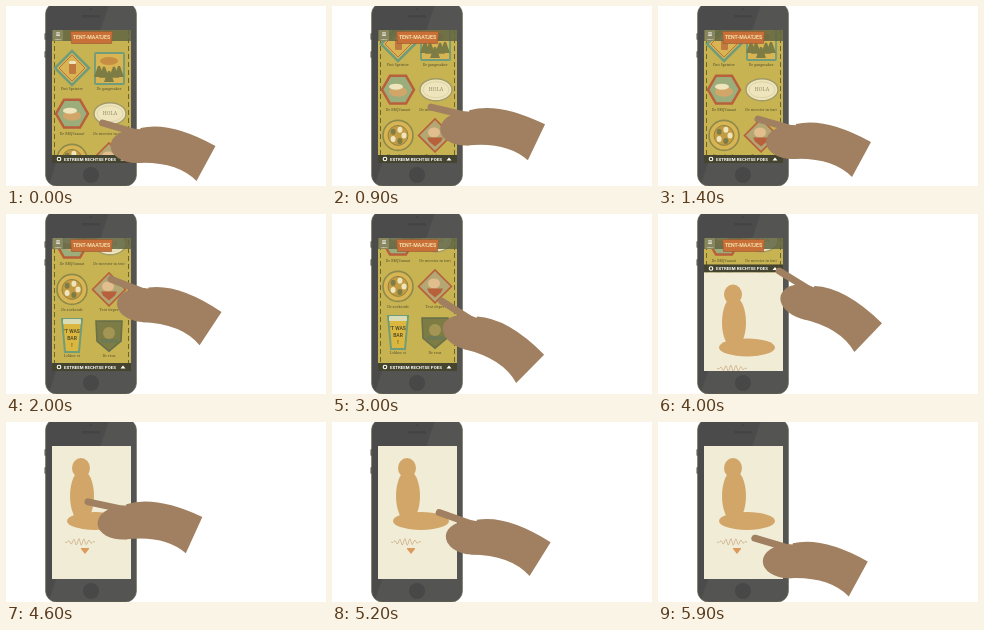
Recreate the animation shown at these times as an HTML page with a canvas. Size 320 by 180 pixels, loop 6000 ms.

```html
<!DOCTYPE html>
<html lang="nl">
<head>
<meta charset="utf-8">
<title>Telefoon met hand</title>
<style>
html, body { margin: 0; width: 100%; height: 100%; overflow: hidden; background: #fff; }
canvas { display: block; width: 100vw; height: 100vh; }
</style>
</head>
<body>
<canvas id="stage" width="320" height="180"></canvas>
<script>
const ctx = document.getElementById('stage').getContext('2d');
const LOOP = 6000, STEP = 100;
const SCREEN = { x: 46, y: 24, w: 79, h: 133 };
const TEAL = '#6f9c7a', CREAM = '#efe5bd', RED = '#b8603c', DARK = '#55502c';
const GOLD = '#d8b552', OLIVE = '#7d7c45', TAN = '#d2a668';

const REST = { x: 94.5, y: 117, tilt: 0 };
const GESTURES = [
  { until: 850, x: 97, y: 101, tilt: -3 },
  { until: 1400, x: 98, y: 113, tilt: 0 },
  { until: 2000, x: 103, y: 65, tilt: 5 },
  { until: 2900, x: 108, y: 87, tilt: 16 },
  { until: 3500, x: 108, y: 83, tilt: 17 },
  { until: 4200, x: 122, y: 50, tilt: 15 },
  { until: 4600, x: 80, y: 80, tilt: -4 },
  { until: 4950, x: 107, y: 86, tilt: 4 },
  { until: LOOP, ...REST }
];

function ease(t, from, to) {
  const u = Math.min(1, Math.max(0, (t - from) / (to - from)));
  return u * u * (3 - 2 * u);
}

function handPose(t) {
  let pose = REST, start = 0;
  for (const next of GESTURES) {
    const s = ease(t, start, next.until);
    const mix = key => pose[key] + (next[key] - pose[key]) * s;
    pose = { x: mix('x'), y: mix('y'), tilt: mix('tilt') };
    start = next.until;
  }
  return pose;
}

const scrollAt = t => 24 * ease(t, 0, 900) + 54 * ease(t, 1400, 2000) + 3 * ease(t, 2000, 3000);

function paint(fill, stroke, width = 1) {
  if (fill) { ctx.fillStyle = fill; ctx.fill(); }
  if (stroke) { ctx.strokeStyle = stroke; ctx.lineWidth = width; ctx.stroke(); }
}

function box(x, y, w, h, r, fill, stroke, width) {
  ctx.beginPath();
  ctx.roundRect(x, y, w, h, r);
  paint(fill, stroke, width);
}

function oval(x, y, rx, ry, fill, stroke, width) {
  ctx.beginPath();
  ctx.ellipse(x, y, rx, ry, 0, 0, 2 * Math.PI);
  paint(fill, stroke, width);
}

function regular(x, y, r, n, fill, stroke, width) {
  ctx.beginPath();
  for (let i = 0; i < n; i++) {
    const a = i * 2 * Math.PI / n;
    ctx.lineTo(x + r * Math.cos(a), y + r * Math.sin(a));
  }
  ctx.closePath();
  paint(fill, stroke, width);
}

// A symmetric trapezium, optionally ending in a point below.
function taper(x, y, top, bottom, h, point, fill, stroke, width) {
  ctx.beginPath();
  ctx.moveTo(x - top, y);
  ctx.lineTo(x + top, y);
  ctx.lineTo(x + bottom, y + h);
  ctx.lineTo(x, y + h + point);
  ctx.lineTo(x - bottom, y + h);
  ctx.closePath();
  paint(fill, stroke, width);
}

function text(s, x, y, font, color, align = 'center') {
  ctx.font = font;
  ctx.fillStyle = color;
  ctx.textAlign = align;
  ctx.textBaseline = 'middle';
  ctx.fillText(s, x, y);
}

function drawPhone() {
  [27, 45].forEach(y => box(38.5, y, 3, 7, 1, '#555'));
  const shine = ctx.createLinearGradient(60, 80, 90, 90);
  shine.addColorStop(0.45, '#4a4b4a');
  shine.addColorStop(0.5, '#545553');
  box(39.6, -3, 90.8, 183, 11, shine, '#68694f', 0.7);
  box(76, 9, 18, 2.5, 1.2, '#444543');
  oval(85, 3, 1.3, 1.3, '#444543');
  oval(85, 169, 8, 8, '#474847');
}

const badges = [
  ['Pint Sprinter', (x, y) => {
    regular(x, y, 17, 4, GOLD, TEAL, 2.5);
    regular(x, y, 13, 4, null, RED, 0.8);
    box(x - 3, y - 7, 7, 13, 1, '#bf7a42');
    box(x - 3, y - 7, 7, 3, 1, CREAM);
  }],
  ['De gangmaker', (x, y) => {
    box(x - 14, y - 15, 29, 31, 1, GOLD, TEAL, 1.8);
    for (let i = -2; i <= 2; i++) taper(x + 5 * i, y + 3 * Math.cos(2 * i), 1, 5, 11, 0, OLIVE);
    oval(x, y - 7, 9, 4, '#c58e43');
  }],
  ["De BBQ'fanaat", (x, y) => {
    regular(x, y, 16, 6, '#9cad7c', RED, 2.5);
    oval(x, y + 2, 9, 5, TAN);
    oval(x - 2, y - 3, 7, 3, CREAM);
  }],
  ['De meester in tent', (x, y) => {
    oval(x + 1, y, 16, 11, CREAM, '#a19b68', 1.4);
    oval(x + 1, y, 13, 8, null, '#cfc799', 0.6);
    text('HOLA', x + 1, y, '5px "Noto Serif", serif', '#8f8c67');
  }],
  ['De zoekende', (x, y) => {
    oval(x, y, 15, 15, GOLD, '#8d8a4b', 1.6);
    oval(x, y, 10, 10, '#c39b43', OLIVE, 0.8);
    for (let i = 0; i < 5; i++) {
      oval(x + 6 * Math.cos(i * 1.26), y + 6 * Math.sin(i * 1.26), 2.5, 3, i % 2 ? OLIVE : CREAM);
    }
  }],
  ['Tent sleper', (x, y) => {
    regular(x, y, 16.5, 4, '#b3a873', RED, 1.6);
    oval(x - 1, y - 3, 6, 5, '#e2bd8d');
    taper(x, y + 2, 8, 6, 4, 5, RED);
  }],
  ['Lekker ei', (x, y) => {
    taper(x, y - 16, 10, 7, 33, 0, '#dbb73f', TEAL, 2);
    box(x - 9, y - 16, 18, 5, 1, '#d9dcb4');
    ["'T WAS", 'BAR', '!'].forEach((s, i) =>
      text(s, x, y - 4 + 7 * i, 'bold 5px Roboto, sans-serif', DARK));
  }],
  ['De reus', (x, y) => {
    taper(x, y - 14, 13, 12, 20, 10, OLIVE, '#69704a', 1.6);
    oval(x, y - 2, 6, 6, '#a39655');
    box(x - 8, y + 4, 17, 4, 1, '#6d7a52');
  }]
];

function drawList(scroll) {
  ctx.fillStyle = '#c7b352';
  ctx.fillRect(SCREEN.x, SCREEN.y, SCREEN.w, SCREEN.h);
  ctx.beginPath();
  ctx.setLineDash([5, 3]);
  ctx.lineDashOffset = scroll;
  [48.5, 122.5].forEach(x => { ctx.moveTo(x, 24); ctx.lineTo(x, 149); });
  paint(null, DARK, 0.8);
  ctx.setLineDash([]);

  badges.forEach(([name, draw], i) => {
    const x = i % 2 ? 103 : 66, y = 62 + 45.7 * (i >> 1) - scroll;
    draw(x, y);
    text(name, x, y + 20.5, '3.6px "Noto Serif", serif', DARK);
  });
  drawHeader();
}

function drawHeader() {
  ctx.fillStyle = 'rgba(96, 101, 67, 0.85)';
  ctx.fillRect(SCREEN.x, SCREEN.y, SCREEN.w, 11);
  box(47, 24, 10, 11, 1, '#88865f');
  text('≡', 52, 28, 'bold 6px "DejaVu Sans", sans-serif', '#fff');
  text('MENU', 52, 33, '2.4px Roboto, sans-serif', '#fff');
  taper(85.5, 25.5, 21, 20, 12, 0, '#c87037', '#985934', 0.6);
  text('TENT-MAATJES', 85.5, 31.6, 'bold 5.2px Roboto, sans-serif', '#f3dfaa');
}

function drawBar(y) {
  ctx.fillStyle = '#44442f';
  ctx.fillRect(SCREEN.x, y, SCREEN.w, 8);
  oval(53, y + 4, 1.8, 1.8, null, '#fff', 1.1);
  text('EXTREEM RECHTSE POES', 58, y + 4.3, 'bold 4.4px Roboto, sans-serif', '#fff', 'left');
  taper(117, y + 2.5, 0, 2.5, 3, 0, '#fff');
}

function drawPoster(top) {
  ctx.save();
  ctx.translate(0, top - SCREEN.y);
  ctx.fillStyle = '#f1ecd5';
  ctx.fillRect(SCREEN.x, SCREEN.y, SCREEN.w, SCREEN.h);
  oval(75, 46, 9, 10, TAN);
  oval(76, 74, 12, 26, TAN);
  oval(89, 99, 28, 9, TAN);
  ctx.beginPath();
  for (let i = 0; i <= 30; i++) {
    ctx.lineTo(59 + i, 120 + 3.5 * Math.sin(i * 1.25) * Math.sin(i / 9.5));
  }
  paint(null, '#c9a683', 0.7);
  taper(79, 126, 4, 4, 1, 5, '#dc9a5c');
  ctx.restore();
}

function drawScreen(t) {
  const open = ease(t, 3600, 4200);
  const top = SCREEN.y + SCREEN.h * (1 - open);
  ctx.save();
  ctx.beginPath();
  ctx.rect(SCREEN.x, SCREEN.y, SCREEN.w, SCREEN.h);
  ctx.clip();
  drawList(scrollAt(t));
  drawBar(top - 8);
  if (open) drawPoster(top);
  ctx.restore();
}

// Plain single-colour hand: a finger, a fist and a wrist.
function drawHand(t) {
  const { x, y, tilt } = handPose(t);
  const color = '#a08060';
  ctx.save();
  ctx.translate(x, y);
  ctx.rotate(tilt * Math.PI / 180);
  ctx.lineCap = 'round';
  ctx.beginPath();
  ctx.moveTo(2, 0);
  ctx.lineTo(40, 11);
  paint(null, color, 7);
  oval(36, 23, 26, 17, color);
  ctx.beginPath();
  ctx.moveTo(40, 5);
  ctx.quadraticCurveTo(70, -2, 115, 23);
  ctx.lineTo(96, 58);
  ctx.quadraticCurveTo(76, 38, 36, 40);
  paint(color);
  ctx.restore();
}

function frame(now) {
  const t = Math.floor(now % LOOP / STEP) * STEP;
  ctx.fillStyle = '#fff';
  ctx.fillRect(0, 0, 320, 180);
  drawPhone();
  drawScreen(t);
  drawHand(t);
  requestAnimationFrame(frame);
}

frame(0);
</script>
</body>
</html>
```
